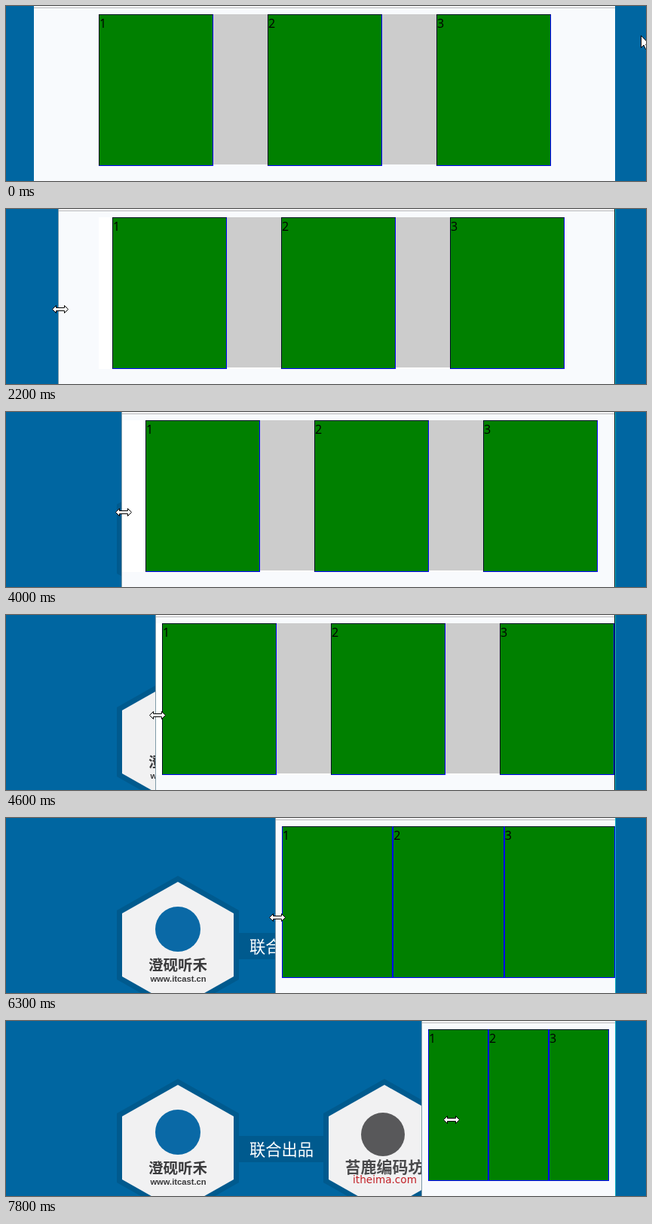
These frames come from a looping animation (849x233 px, 8000 ms). An HTML page:

```html
<!DOCTYPE html>
<html lang="zh">
<head>
<meta charset="utf-8">
<title>Flex resize</title>
<style>
  html, body { margin: 0; width: 100%; height: 100%; overflow: hidden; background: #0066a1; }
  #stage { position: relative; width: 849px; height: 233px; overflow: hidden; }
  svg { position: absolute; left: 0; top: 0; }
  .cjk { font-family: "Noto Sans CJK SC", "Noto Sans CJK", sans-serif; }
  #window { position: absolute; top: 0; height: 233px; overflow: hidden; background: #f8fafd; }
  #bar { height: 2px; background: #f5f5f6; border-bottom: 1px solid #b9babc; }
  #trail { position: absolute; top: 11px; width: 600px; height: 202px; background: #fff; }
  #row { position: absolute; top: 11px; height: 200px; background: #ccc;
    display: flex; justify-content: space-between; align-items: flex-start; }
  #row div { width: 150px; height: 200px; background: green; border: 1px solid #00f;
    border-color: #001020 #00f #00f #001020; color: #000; font: 16px/22px "Open Sans", sans-serif; }
  #row.narrow div { border-left-color: #00f; }
  .edge { position: absolute; top: 0; width: 1px; height: 233px; }
  #rightGlow { left: 808px; background: #1ab4c4; }
  #rightDark { left: 807px; background: #04151c; }
</style>
</head>
<body>
<div id="stage">
  <svg width="849" height="233" text-anchor="middle">
    <rect x="300" y="153" width="130" height="35" fill="#005a8e"/>
    <g id="badges"></g>
    <text class="cjk" x="365.5" y="178.500" font-size="21.3" font-weight="500" fill="#fff">联合出品</text>
    <circle cx="228" cy="148" r="30" fill="#0a69a6"/>
    <text class="cjk" x="228" y="203" font-size="19.500" font-weight="700" fill="#3a3a3c">澄砚听禾</text>
    <text x="228.500" y="218" font-size="11.2" font-weight="700" fill="#3a3a3c" font-family="Liberation Sans, sans-serif">www.itcast.cn</text>
    <circle cx="500" cy="151" r="29" fill="#58585a"/>
    <text class="cjk" x="502" y="202" font-size="21" font-weight="700" fill="#4a4a4c">苔鹿编码坊</text>
    <text x="502.500" y="216" font-size="13.6" fill="#c22026" font-family="DejaVu Sans, sans-serif">itheima.com</text>
  </svg>
  <div id="window">
    <div id="bar"></div>
    <div id="trail"></div>
    <div id="row"><div>1</div><div>2</div><div>3</div></div>
  </div>
  <div class="edge" id="leftEdge"></div>
  <div class="edge" id="rightDark"></div>
  <div class="edge" id="rightGlow"></div>
  <svg width="849" height="233" fill="#fff" stroke="#000">
    <path id="arrow" d="M.5 .5V16.500L4 13L6.500 18.500L9 17.500L6.700 12H11.500Z"/>
    <path id="resize" d="M-10.500 .5L-5.500 -4.500V-1.500H5.500V-4.500L10.500 .5L5.500 5.500V2.500H-5.500V5.500Z"/>
  </svg>
</div>
<script>
const LOOP = 8000, STEP = 100, RIGHT = 808, MIN_LEFT = 552, MARGIN = 8;
const $ = id => document.getElementById(id);
const show = (el, on) => { el.style.display = on ? '' : 'none'; };

// Time and x of the dragged left edge.
const drag = [
  [1500, 37], [2400, 80], [2900, 98], [3000, 102], [3300, 123], [3900, 146], [4000, 154],
  [4200, 169], [5100, 237], [5200, 246], [5300, 248], [6000, 316], [6200, 350], [6300, 358],
  [6900, 457], [7800, 589]
];

function dragX(t) {
  if (t <= drag[0][0]) return drag[0][1];
  const i = drag.findIndex(([time]) => time >= t);
  if (i < 0) return drag[drag.length - 1][1];
  const [t0, x0] = drag[i - 1], [t1, x1] = drag[i];
  return Math.round(x0 + (x1 - x0) * (t - t0) / (t1 - t0));
}

const windowLeft = t => Math.min(MIN_LEFT, dragX(t));

function hexagon(cx, halfWidth, radius, fill) {
  const cy = 169, h = radius / 2;
  const points = [[0, -radius], [halfWidth, -h], [halfWidth, h], [0, radius], [-halfWidth, h], [-halfWidth, -h]]
    .map(([x, y]) => `${cx + x},${cy + y}`).join(' ');
  return `<polygon points="${points}" fill="${fill}"/>`;
}

$('badges').innerHTML = [228, 502]
  .map(cx => hexagon(cx, 81, 92, '#005a8e') + hexagon(cx, 74, 84, '#f1f1f2')).join('');

function drawCursor(t) {
  const moving = t < 900;
  show($('arrow'), moving);
  show($('resize'), !moving);
  if (moving) {
    const p = Math.min(1, t / 800), ease = p * p * (3 - 2 * p);
    const x = Math.round(842 - 796 * ease), y = Math.round(39 + 106 * ease);
    $('arrow').setAttribute('transform', `translate(${x} ${y})`);
  } else {
    const x = dragX(t) + (t < 1600 ? -1 : 2);
    const y = t < 1600 ? 134 : t < 6000 ? 133 : t < 7000 ? 132 : 131;
    $('resize').setAttribute('transform', `translate(${x} ${y})`);
  }
}

function draw(t) {
  const left = windowLeft(t);
  // The page layout lags one step behind the window edge.
  const pageWidth = RIGHT - windowLeft(t - STEP);
  const rowWidth = Math.min(600, pageWidth - 2 * MARGIN);
  const win = $('window').style, row = $('row');

  win.left = left + 'px';
  win.width = RIGHT - left + 'px';
  row.style.left = Math.round((pageWidth - rowWidth) / 2 + .1) + 'px';
  row.style.width = rowWidth + 'px';
  row.className = rowWidth < 600 ? 'narrow' : '';

  $('trail').style.left = 123 - left + 'px';
  show($('trail'), t >= 1600 && t < 5500);

  const pressed = t >= 1400, dragging = t >= 1600;
  $('leftEdge').style.left = left - 1 + 'px';
  $('leftEdge').style.background = dragging ? '#7f9aa8' : '#1ab4c4';
  show($('leftEdge'), pressed);
  show($('rightGlow'), pressed);
  show($('rightDark'), dragging && t < 6000);
  $('rightDark').style.width = t >= 5000 ? '2px' : '1px';
  $('rightDark').style.left = t >= 5000 ? '806px' : '807px';
  drawCursor(t);
}

const start = performance.now();
function tick() {
  const t = (performance.now() - start) % LOOP;
  draw(Math.floor(t / STEP) * STEP);
  requestAnimationFrame(tick);
}
tick();
</script>
</body>
</html>
```
